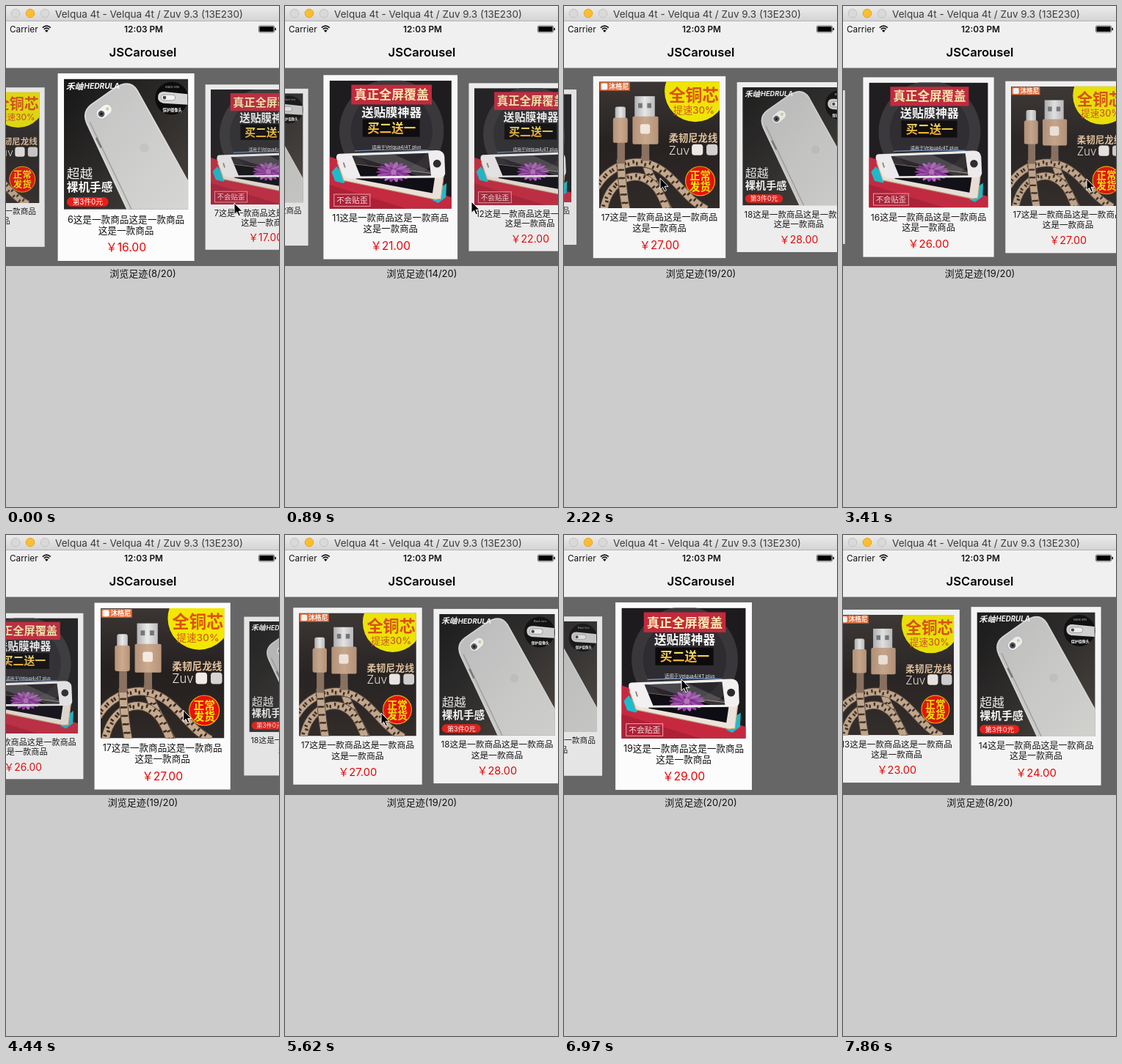
Animation, 372 px wide and 684 px high, one loop 8 s. Source, as an HTML page:

```html
<!DOCTYPE html>
<html lang="zh-CN">
<head>
<meta charset="utf-8">
<title>JSCarousel</title>
<style>
html, body { margin: 0; width: 100%; height: 100%; overflow: hidden; background: #ccc; }
svg { display: block; width: 100%; height: 100%; }
text { font-family: Inter, 'Noto Sans CJK SC', 'Noto Sans CJK', sans-serif; white-space: pre; }
</style>
</head>
<body>
<svg id="stage" viewBox="0 0 372 684"></svg>
<script>
const LOOP = 8000, STEP = 148;
const COUNT = 20, PITCH = 190, MID_X = 186, MID_Y = 220;
const stage = document.getElementById('stage');

// y is the vertical middle of the text
const txt = (x, y, size, fill, str, more = '') =>
  `<text x="${x}" y="${(y + size * 0.37).toFixed(2)}" font-size="${size}" fill="${fill}" ${more}>${str}</text>`;
const mid = (x, y, size, fill, str, more = '') =>
  txt(x, y, size, fill, str, `text-anchor="middle" ${more}`);
const rect = (x, y, w, h, fill, more = '') =>
  `<rect x="${x}" y="${y}" width="${w}" height="${h}" fill="${fill}" ${more}/>`;
const disc = (x, y, r, fill, more = '') =>
  `<circle cx="${x}" cy="${y}" r="${r}" fill="${fill}" ${more}/>`;
const poly = (points, fill, more = '') => `<polygon points="${points}" fill="${fill}" ${more}/>`;
const line = (d, color, width, more = '') =>
  `<path d="${d}" fill="none" stroke="${color}" stroke-width="${width}" ${more}/>`;
const ramp = (id, stops, dir = 'x2="0" y2="1"') =>
  `<linearGradient id="${id}" ${dir}>` +
  stops.map((c, i) => `<stop offset="${i / (stops.length - 1)}" stop-color="${c}"/>`).join('') +
  '</linearGradient>';
const BOLD = 'font-weight="700"', HEAVY = 'font-weight="900"';

// braided cable: tan core with staggered dark flecks
const cable = d =>
  line(d, '#54443a', 12.5) + line(d, '#c9ab8e', 10.5) +
  line(d, '#3a2d26', 5, 'stroke-dasharray="2.6 9.4" transform="translate(-2 1.5)"') +
  line(d, '#3a2d26', 5, 'stroke-dasharray="2.6 9.4" stroke-dashoffset="-3" transform="translate(2 -1.5)"');

const cablePhoto =
  rect(0, 0, 173, 182, 'url(#cableBg)') +
  cable('M66 108C66 130 84 150 102 190') +
  cable('M6 190C10 150 38 131 62 138C84 146 90 165 100 190') +
  cable('M-4 152C14 121 50 108 80 122C110 136 122 168 154 184') +
  cable('M31 112C32 140 34 160 40 190') +
  rect(61, 88, 11, 26, '#8c7260') + rect(26, 86, 11, 32, '#8c7260') +
  rect(51, 21, 29, 34, 'url(#metal)') + rect(56, 31, 6, 7, '#77777a') + rect(69, 31, 6, 7, '#77777a') +
  rect(48, 50, 37, 40, 'url(#gold)', 'rx="2"') +
  rect(59, 61, 14, 14, '#f7ede4', 'rx="3"') +
  rect(23, 36, 15, 20, 'url(#metal)', 'rx="3"') + rect(20, 52, 21, 36, 'url(#gold)', 'rx="3"') +
  rect(1, 1, 43, 12, '#ee7038') + rect(3, 2.5, 9, 9, '#fff', 'rx="2"') +
  txt(14, 7, 9.6, '#fff', '沐格尼', BOLD) +
  disc(138, 14, 44, '#f7ec00') +
  mid(136, 19, 24, '#e2500c', '全铜芯', HEAVY) +
  mid(136, 41, 14, '#d9581a', '提速30%', 'font-weight="500"') +
  txt(100, 81, 14, '#ecc9a2', '柔韧尼龙线', BOLD) +
  txt(100, 98.5, 17, '#f1e8e0', 'Zuv', 'font-weight="300"') +
  rect(133, 90, 16, 16, '#f4efec', 'rx="4"') + rect(154, 90, 16, 16, '#d9d6d6', 'rx="4"') +
  disc(145, 143, 21, '#ee0d08', 'stroke="#f2b400" stroke-width="1.2"') +
  mid(145, 135.5, 15, '#fff200', '正常', HEAVY) + mid(145, 151, 15, '#fff200', '发货', HEAVY);

const casePhoto =
  rect(0, 0, 173, 182, 'url(#caseBg)') +
  '<path d="M32 62Q25 46 38 36L72 12Q92 0 102 16L182 160V190H92Z" fill="url(#shell)" stroke="#dcdcdc" stroke-width="2"/>' +
  line('M36 60L97 188', '#a2a2a2', 1.5) + line('M45 82l7 14', '#777', 2.5) +
  '<g transform="translate(56 45.5) rotate(-40)">' +
  rect(-12, -7.5, 24, 15, '#f6f6f6', 'rx="7.5" stroke="#bdbdbd"') +
  disc(-5, 0, 4.5, '#55595c') + disc(-5, 0, 2, '#16181a') + disc(6, 0, 2.2, '#d9cfa4') + '</g>' +
  disc(112, 96, 6.5, '#c6c6c6') +
  disc(150, 27, 23, '#0b0b0b') +
  '<path d="M131 24Q132 17 142 18L172 21V36L138 34Q130 32 131 24Z" fill="#d8d8d8"/>' +
  rect(135, 22, 20, 8, '#f6f6f6', 'rx="4" stroke="#888" stroke-width=".8"') + disc(140, 26, 2.4, '#444') +
  mid(151, 11, 4, '#bbb', 'Black lens') +
  mid(151, 43, 5.4, '#fff', '保护摄像头', BOLD) +
  txt(3, 10, 12, '#fff', '禾岫', `${HEAVY} font-style="italic"`) +
  txt(28, 10, 10.4, '#fff', 'HEDRULA', `${BOLD} font-style="italic"`) +
  txt(4, 132, 18, '#f5f5f5', '超越', 'font-weight="300"') +
  txt(4, 151, 16, '#fff', '裸机手感', BOLD) +
  rect(4, 165, 58, 13, '#ee1c16', 'rx="6.5"') + mid(33, 171.5, 10, '#fff', '第3件0元');

const petals = Array.from({ length: 18 }, (_, i) =>
  `<ellipse cx="13" rx="12" ry="3.4" fill="${i % 2 ? '#9a3cb0' : '#c462cf'}" transform="rotate(${i * 20})"/>`).join('');

const glassPhoto =
  rect(0, 0, 173, 182, '#1c1a1d') + disc(88, 72, 74, '#39373a') + disc(88, 72, 58, '#2d2b2f') +
  poly('0,108 173,166 173,182 0,182', '#c8283f') + poly('0,148 110,182 0,182', '#b01f36') +
  poly('3,130 10,122 25,140 20,146 8,143', '#19bfd0') +
  poly('146,170 152,156 166,146 165,166 154,174', '#19bfd0') +
  poly('11,116 162,134 158,168 150,169 20,142', '#efe6de', 'stroke="#c9a27c" stroke-width="1.2" stroke-linejoin="round"') +
  poly('28,118 150,133 146,160 38,140', '#0d0c12') +
  `<g transform="translate(91 130) scale(1 .58)">${petals}</g>` +
  disc(91, 130, 4, '#e48ae6') +
  '<path fill-rule="evenodd" d="M14 104L152 99Q162 99 163 108L164 132Q163 138 156 138L28 139Q21 139 18 131L10 111Q9 104 14 104ZM32 107L44 136L144 135L140 103Z" fill="#f5f3f3"/>' +
  poly('32,107 140,103 144,135 44,136', '#15131c', 'fill-opacity=".2"') +
  poly('36,107 92,105 144,129 144,135 124,135', '#fff', 'fill-opacity=".16"') +
  disc(152.5, 118, 5.6, '#2b292c') + rect(20, 116, 2, 8, '#8c8c90', 'rx="1" transform="rotate(-18 21 120)"') +
  line('M36 100Q90 97 140 99', '#8db9ef', 1.4, 'stroke-opacity=".7"') +
  rect(31, 6, 114, 28, '#c6283d') + mid(88, 20, 17.6, '#fff2b4', '真正全屏覆盖', HEAVY) +
  mid(88, 44.5, 17, '#fff', '送贴膜神器', HEAVY) +
  rect(47, 55, 81, 25, '#0c0a0b') + mid(88, 67.5, 17.2, 'url(#amber)', '买二送一', HEAVY) +
  mid(95, 95, 6.5, '#f2f2f2', '适用于Velqua4/4T plus') +
  rect(6.5, 161.5, 51, 17, 'none', 'stroke="#f0a9b3" stroke-width="1"') +
  mid(32, 170, 11, '#f9dfe2', '不会贴歪');

const photos = ['glass', 'cable', 'case', 'glass'];

const card = i =>
  `<g class="card">${rect(-95, -130.75, 190, 261.5, '#fff')}` +
  `<use href="#${photos[i % 4]}" x="-86.5" y="-123"/>` +
  mid(0, 72.6, 12.9, '#111', i + '这是一款商品这是一款商品') +
  mid(0, 88, 12.9, '#111', '这是一款商品') +
  mid(0, 111.6, 16, '#f00000', `￥${10 + i}.00`) + '</g>';

const photoDef = (id, body) => `<g id="${id}" clip-path="url(#frame)">${body}</g>`;

stage.innerHTML = '<defs>' +
  ramp('bar', ['#ebebeb', '#d3d3d3']) +
  ramp('cableBg', ['#3a3432', '#231f1e', '#2e2826']) +
  ramp('caseBg', ['#161616', '#2c2a29', '#4b443e'], 'x2="1" y2="1"') +
  ramp('shell', ['#c2c3c2', '#d0d1cf', '#dadad7'], 'x2="1" y2="1"') +
  ramp('metal', ['#b4b4b7', '#eeeeee', '#c0c0c3'], 'x2="1" y2="0"') +
  ramp('gold', ['#b8957a', '#cfac8f', '#ba967a'], 'x2="1" y2="0"') +
  ramp('amber', ['#fff07a', '#f5a312']) +
  `<clipPath id="frame">${rect(0, 0, 173, 182, '#000')}</clipPath>` +
  photoDef('cable', cablePhoto) + photoDef('case', casePhoto) + photoDef('glass', glassPhoto) +
  '</defs>' +
  rect(0, 0, 372, 684, '#ccc') + rect(0, 85, 372, 270, '#666') +
  Array.from({ length: COUNT }, (_, i) => card(i)).join('') +
  mid(186.5, 365, 13, '#111', '', 'id="label"') +
  rect(0, 0, 372, 21, 'url(#bar)') + rect(0, 20, 372, 1, '#b4b4b4') +
  disc(13, 10, 5.8, '#d9d9d9', 'stroke="#c3c3c3"') +
  disc(33, 10, 5.8, '#fdbd2f', 'stroke="#e2a52a"') +
  disc(53, 10, 5.8, '#d9d9d9', 'stroke="#c3c3c3"') +
  mid(195, 10.5, 13.5, '#3c3c3c', 'Velqua 4t - Velqua 4t / Zuv 9.3 (13E230)') +
  rect(0, 21, 372, 63, '#f0f0f0') + rect(0, 84, 372, 1, '#b2b2b2') +
  txt(5, 31.3, 11.8, '#111', 'Carrier') +
  line('M49.8 29.6Q55.3 24.6 60.8 29.6M51.8 31.8Q55.3 28.6 58.8 31.8', '#111', 1.6) +
  '<path d="M53 33.5Q55.3 31.6 57.6 33.5L55.3 36Z" fill="#111"/>' +
  mid(187.5, 31.3, 11.8, '#111', '12:03 PM', 'font-weight="600"') +
  rect(344.4, 26.9, 21.2, 9.2, 'none', 'rx="2" stroke="#333" stroke-width=".7"') +
  rect(345.4, 27.9, 19.2, 7.2, '#000', 'rx="1"') + rect(366.4, 29.8, 1.6, 3.6, '#000', 'rx=".8"') +
  mid(186.5, 63, 16.6, '#000', 'JSCarousel', 'font-weight="600"') +
  '<path id="pointer" d="M0 0V15.5L3.6 12.2L6 17.8L8.5 16.7L6.1 11.3H11Z" fill="#000" stroke="#fff" stroke-width="1"/>';

const cards = [...stage.querySelectorAll('.card')];
const label = document.getElementById('label');
const pointer = document.getElementById('pointer');

// time, x, y
const pointerKeys = [
  [0, 311, 269], [150, 311, 269], [380, 325, 268], [482, 262, 267], [888, 254, 267],
  [1400, 330, 250], [1570, 140, 238], [2220, 131, 235], [2300, 131, 236], [3404, 332, 236],
  [5624, 131, 243], [6000, 85, 225], [6956, 160, 197], [7480, 165, 197], [7678, 360, 205], [7844, 400, 205]
];
const labelKeys = [[0, 8], [482, 14], [1570, 19], [6000, 20], [7678, 8]];

const smooth = u => u * u * (3 - 2 * u);
const mix = (a, b, u) => a + (b - a) * u;
const ease = (t, t0, t1, a, b) => mix(a, b, smooth(Math.min(1, Math.max(0, (t - t0) / (t1 - t0)))));
const glide = (t, t0, a, b) => mix(b, a, Math.exp((t0 - t) / 325));

function pointerAt(t) {
  const i = Math.max(1, pointerKeys.findIndex(k => k[0] >= t));
  const [t0, x0, y0] = pointerKeys[i - 1], [t1, x1, y1] = pointerKeys[i];
  return [ease(t, t0, t1, x0, x1), ease(t, t0, t1, y0, y1)];
}

// index of the item at the centre; flicks decay, drags follow the pointer
function position(t, pointerX) {
  if (t < 482) return glide(t, 0, 6.118, 7);
  if (t < 1570) return glide(t, 482, 6.8, 13);
  if (t < 2300) return glide(t, 1570, 12.79, 18);
  if (t < 6000) return 17.458 - (pointerX - 131) / 184;
  if (t < 6960) return glide(t, 6000, 17.7, 19.2);
  if (t < 7480) return ease(t, 6960, 7350, 19.12, 19);
  if (t < 7678) return ease(t, 7480, 7678, 19, 17.99);
  return glide(t, 7678, 17.99, 7);
}

function draw(time) {
  const t = Math.min(53, Math.floor((time + 5) / STEP)) * STEP;
  const [px, py] = pointerAt(t);
  const pos = position(t, px);
  cards.forEach((el, i) => {
    const d = (i - pos) * PITCH;
    const scale = 1 / (1 + Math.abs(d) * 0.00095);
    el.style.display = Math.abs(d) < 290 ? '' : 'none';
    el.setAttribute('transform', `translate(${(MID_X + d).toFixed(2)} ${MID_Y}) scale(${scale.toFixed(4)})`);
    el.setAttribute('opacity', scale.toFixed(3));
  });
  label.textContent = `浏览足迹(${labelKeys.filter(k => k[0] <= t).pop()[1]}/${COUNT})`;
  pointer.setAttribute('transform', `translate(${px.toFixed(1)} ${py.toFixed(1)})`);
}

const start = performance.now();
function tick() {
  draw((performance.now() - start) % LOOP);
  requestAnimationFrame(tick);
}
tick();
</script>
</body>
</html>
```
